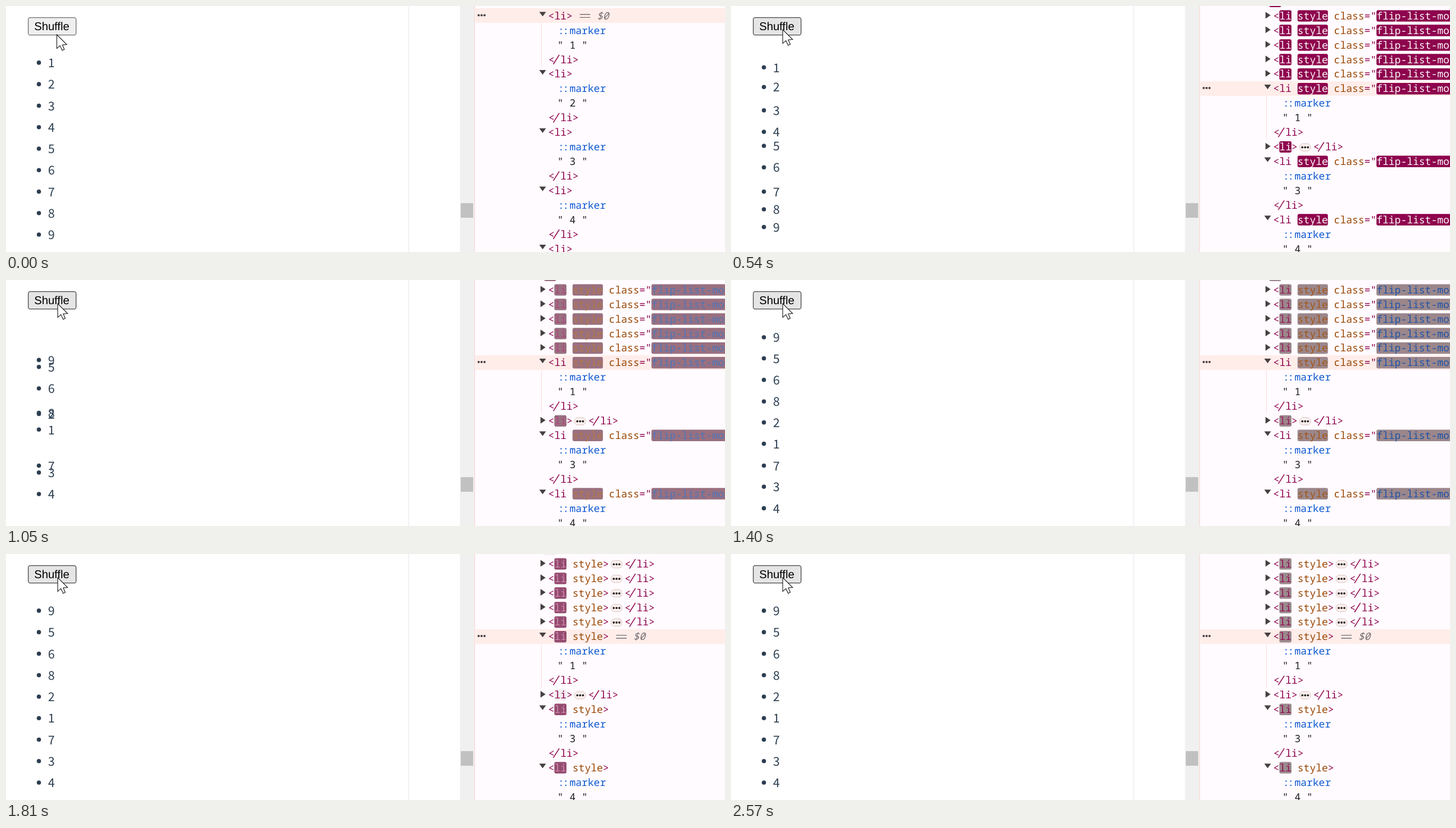
An HTML page that plays this animation: 1279x438 px, repeating every 2640 ms.

```html
<!DOCTYPE html>
<html lang="en">
<head>
<meta charset="utf-8">
<title>Shuffle</title>
<style>
html, body { margin: 0; width: 100%; height: 100%; overflow: hidden; background: #fff; }
svg { display: block; }
text { white-space: pre; text-rendering: geometricPrecision; }
.code { font: 18px "Noto Sans Mono", "DejaVu Sans Mono", monospace; }
.slant { font-style: italic; }
.item { font: 21.5px "Noto Sans CJK JP", "Noto Sans CJK SC", "Noto Sans CJK KR", "Noto Sans", sans-serif; fill: #2c3e50; }
.label { font: 20.2px "Liberation Sans", Arial, sans-serif; }
</style>
</head>
<body>
<svg id="stage" width="1279" height="438" viewBox="0 0 1279 438"></svg>
<script>
const LOOP = 2640, HOVER = 30, PRESS = 380, RELEASE = 450;
const MOVE = 480, MOVE_TIME = 1000;   // list items travel
const MARKED = 535, CLEARED = 1560;   // inspector tree updates
const CW = 10.8, ROW = 25.92, ROW0 = 17.4, TAG_X = 964.6;
const TAG = [142, 0, 75], ATTR = [153, 69, 0], VALUE = [8, 66, 160];
const META = [155, 139, 141], WHITE = [255, 255, 255];
const BLUE = "#0b57d0", INK = "#1f1f1f", ICON = "#474041";

const stage = document.getElementById("stage");
const rgb = c => `rgb(${c.map(Math.round)})`;
const mix = (a, b, k) => a.map((v, i) => v + (b[i] - v) * k);

function el(parent, name, attrs, text) {
  const node = document.createElementNS("http://www.w3.org/2000/svg", name);
  set(node, attrs);
  if (text !== undefined) node.textContent = text;
  return parent.appendChild(node);
}

function set(node, attrs) {
  for (const key in attrs) node.setAttribute(key, attrs[key]);
}

function bezier(x1, y1, x2, y2) {
  const at = (a, b, t) => 3 * a * t * (1 - t) ** 2 + 3 * b * t * t * (1 - t) + t ** 3;
  return x => {
    if (x <= 0) return 0;
    if (x >= 1) return 1;
    let lo = 0, hi = 1;
    for (let i = 0; i < 30; i++) {
      const mid = (lo + hi) / 2;
      if (at(x1, x2, mid) < x) lo = mid; else hi = mid;
    }
    return at(y1, y2, lo);
  };
}
const ease = bezier(0.25, 0.1, 0.25, 1);
const fade = bezier(0, 0, 0.2, 1);

// ---- page side ----
el(stage, "rect", { width: 1279, height: 438, fill: "#fff" });
el(stage, "rect", { x: 716, width: 1, height: 438, fill: "#e5e7ea" });
el(stage, "rect", { x: 807.5, width: 25.5, height: 438, fill: "#f0f0f0" });
el(stage, "rect", { x: 809, y: 351, width: 22, height: 26, fill: "#c1c1c1" });

const button = el(stage, "rect", { x: 39.6, y: 20.7, width: 85, height: 31, rx: 3.5, "stroke-width": 1.3 });
el(stage, "text", { x: 50.2, y: 42.6, class: "label" }, "Shuffle");

const items = [9, 5, 6, 8, 2, 1, 7, 3, 4].map((n, to) => {
  const node = el(stage, "g", {});
  el(node, "circle", { cx: 58.5, r: 3.8, fill: "#2c3e50" });
  el(node, "text", { x: 74.8, y: 8.2, class: "item" }, n);
  return { node, from: n - 1, to };
});

// ---- inspector side ----
el(stage, "rect", { x: 833, width: 446, height: 438, fill: "#fffbff" });

const flashes = [];
const rowY = i => ROW0 + i * ROW;

function write(g, x, row, text, fill, style = "code") {
  const color = Array.isArray(fill) ? rgb(fill) : fill;
  return el(g, "text", { x, y: Math.round(rowY(row) + 6.4), class: style, fill: color }, text);
}

function flash(g, x, row, text, color, start) {
  const box = el(g, "rect", { x, y: rowY(row) - 10, width: text.length * CW, height: 20.4, rx: 3 });
  flashes.push({ box, label: write(g, x, row, text, color), color, start });
}

// Writes a word either plain or with a fading highlight, and gives the next x.
function word(g, x, row, text, color, start) {
  if (start === undefined) write(g, x, row, text, color);
  else flash(g, x, row, text, color, start);
  return x + text.length * CW;
}

// The first two characters are joined, with a long slash.
function closeTag(g, x, row) {
  const y = rowY(row);
  write(g, x + 0.4, row, "<", TAG);
  el(g, "path", { d: `M${x + 9} ${y + 8.6}L${x + 19.6} ${y - 8.2}`, stroke: rgb(TAG), "stroke-width": 1.5 });
  write(g, x + 2 * CW, row, "li>", TAG);
}

function dots(g, x, y, gap, r, fill) {
  for (let i = -1; i < 2; i++) el(g, "circle", { cx: x + i * gap, cy: y, r, fill });
}

function arrow(g, row, open) {
  const y = rowY(row);
  const d = open ? `M948.6 ${y - 7}h12l-6 8.2z` : `M950.8 ${y - 7}v12l9 -6z`;
  el(g, "path", { d, fill: ICON });
}

function selected(g, row) {
  const y = rowY(row), top = Math.round(y - 13);
  el(g, "rect", { x: 835, y: top, width: 444, height: 26, fill: "#ffedea" });
  el(g, "rect", { x: 952, y: top + 26, width: 1, height: 3 * ROW, fill: "#ffdad6" });
  dots(g, 846, y - 1, 5.2, 2, ICON);
}

function dollar(g, x, row) {
  const y = rowY(row);
  el(g, "path", { d: `M${x + 2} ${y - 2.4}h18.6m-18.6 5.4h18.6`, stroke: "#756e70", "stroke-width": 1.4 });
  write(g, x + 3 * CW, row, "$0", "#756e70", "code slant");
}

// o: { li, style, value } are highlight starts; attrs is "", "style" or "class"
function openTag(g, row, attrs, o = {}) {
  let x = word(g, TAG_X, row, "<", TAG);
  x = word(g, x, row, "li", TAG, o.li);
  if (attrs) x = word(g, x + CW, row, "style", ATTR, o.style);
  if (attrs === "class") {
    x = word(g, x + CW, row, "class", ATTR);
    x = word(g, x, row, '="', TAG);
    return word(g, x, row, "flip-list-move", VALUE, o.value);
  }
  return word(g, x, row, ">", TAG);
}

function folded(g, row, attrs, o) {
  arrow(g, row, false);
  const x = openTag(g, row, attrs, o);
  if (attrs === "class") return;
  const y = rowY(row) + 0.9;
  el(g, "rect", { x: x + 3.8, y: y - 6.6, width: 19.4, height: 13.2, rx: 6, fill: "#fdf0ee", stroke: "#d8c2bf" });
  dots(g, x + 13.5, y, 5, 1.9, INK);
  closeTag(g, x + 27.5, row);
}

function unfolded(g, row, n, attrs, o, current) {
  if (current) selected(g, row);
  arrow(g, row, true);
  const x = openTag(g, row, attrs, o);
  if (current && attrs !== "class") dollar(g, x + CW, row);
  const inner = TAG_X + 1.5 * CW;
  write(g, inner + 1.3, row + 1, ":", BLUE);
  write(g, inner + CW - 1, row + 1, ":", BLUE);
  write(g, inner + 2 * CW, row + 1, "marker", BLUE);
  write(g, inner, row + 2, `" ${n} "`, INK);
  closeTag(g, TAG_X, row + 3);
}

const before = el(stage, "g", {});
for (let i = 0; i < 5; i++) unfolded(before, i * 4, i + 1, "", {}, i === 0);

function shuffled(attrs, fresh, kept) {
  const g = el(stage, "g", {});
  flash(g, 957.2, -1, "ul", TAG, MARKED);
  for (let i = 0; i < 5; i++) folded(g, i, attrs, fresh);
  unfolded(g, 5, 1, attrs, kept, true);
  folded(g, 9, "", { li: MARKED });
  unfolded(g, 10, 3, attrs, kept);
  unfolded(g, 14, 4, attrs, kept);
  return g;
}
const attrs = { style: MARKED, value: MARKED };
const moving = shuffled("class", { li: MARKED, ...attrs }, attrs);
const settled = shuffled("style", { li: CLEARED }, { li: CLEARED });

el(stage, "rect", { x: 833, width: 1.2, height: 438, fill: "#fbd5d2" });

const cursor = el(stage, "path", {
  d: "M0 0V24.6L5.7 19.6L9.6 28L13.4 26.3L9.9 18.2L17.6 17.6Z",
  fill: "#fff", stroke: "#111", "stroke-width": 1.1
});

// ---- motion ----
function draw(t) {
  const pressed = t >= PRESS && t < RELEASE;
  const hover = t >= HOVER;
  set(button, {
    fill: pressed ? "#f5f5f5" : hover ? "#e5e5e5" : "#efefef",
    stroke: pressed ? "#8d8d8d" : hover ? "#464646" : "#6e6e6e"
  });
  set(cursor, { transform: hover ? "translate(92 42)" : "translate(90.4 51)" });

  const k = ease((t - MOVE) / MOVE_TIME);
  for (const { node, from, to } of items) {
    set(node, { transform: `translate(0 ${100.9 + 38.27 * (from + (to - from) * k)})` });
  }

  const show = (g, on) => set(g, { visibility: on ? "visible" : "hidden" });
  show(before, t < MARKED);
  show(moving, t >= MARKED && t < CLEARED);
  show(settled, t >= CLEARED);

  for (const { box, label, color, start } of flashes) {
    const age = t - start;
    set(box, {
      fill: rgb(mix(TAG, META, fade(age / 1120))),
      "fill-opacity": 1 - fade((age - 1120) / 280)
    });
    set(label, { fill: rgb(mix(WHITE, color, fade(age / 1400))) });
  }
}

const begin = performance.now();
function tick() {
  draw((performance.now() - begin) % LOOP);
  requestAnimationFrame(tick);
}
draw(0);
requestAnimationFrame(tick);
</script>
</body>
</html>
```
